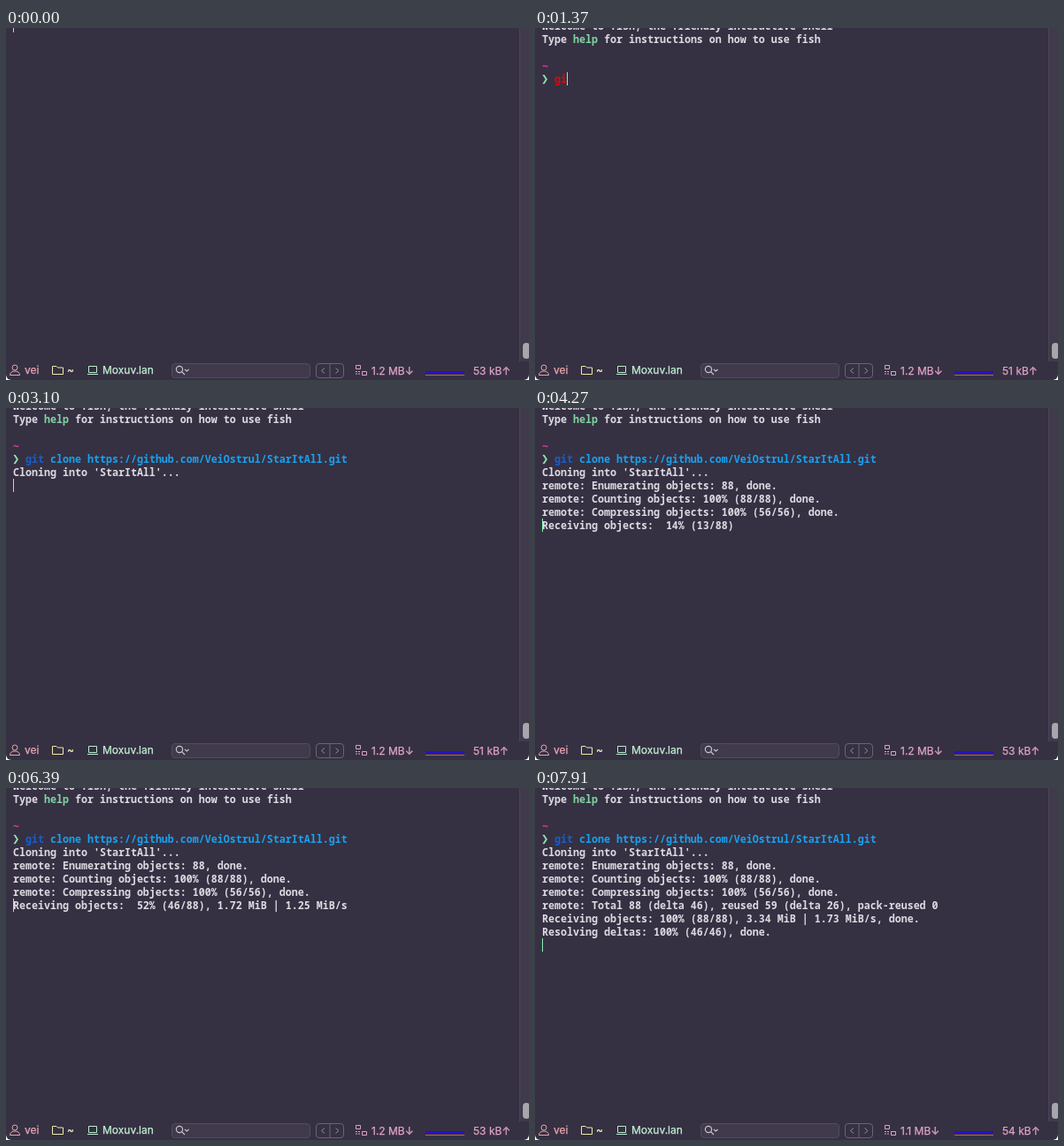
Write an HTML page that moves like this. It is 591x398 px and loops after 8 s.

```html
<!DOCTYPE html>
<html lang="en">
<head>
<meta charset="utf-8">
<title>Terminal clone</title>
<style>
html, body { margin: 0; width: 100%; height: 100%; overflow: hidden; background: #fff; }
#window { position: absolute; left: 0; top: 0; width: 591px; height: 398px; overflow: hidden;
  background: #363043; border-radius: 0 0 6px 6px; }
.row, .label, #cursor, svg { position: absolute; }
.row { left: 8px; height: 15px; white-space: pre; color: #dddae1;
  font: 600 11.667px/15px "Noto Sans Mono", monospace; }
.mark, .tilde { display: inline-block; width: 7px; line-height: 0;
  font-family: "DejaVu Sans Mono", monospace; font-weight: 700; }
.mark { position: relative; left: -1px; color: #8fe0ae; font-size: 14px; }
.tilde { color: #d63da2; }
.help { color: #80d5a2; }
.bad { color: #e00808; }
.cmd { color: #1460cf; }
.arg { color: #18a2ee; }
.hint { color: #69636f; }
.prefix { text-decoration: underline; }
#cursor { width: 1px; height: 15px; background: #8cf0b4; }
svg { left: 0; top: 0; }
.label { top: 379px; white-space: pre; font: 400 12px/16px Inter, sans-serif; -webkit-text-stroke: .25px; }
.net { top: 380px; color: #e0a4c6; }
</style>
</head>
<body>
<div id="window">
  <svg width="591" height="398" fill="none">
    <rect x="580" width="11" height="377" fill="#403a4c"/>
    <path d="M580.5 0V377" stroke="#4a4455"/>
    <rect x="584" y="356" width="8" height="18" rx="4" fill="#a8a5ad"/>
    <g stroke="#e6a4ab">
      <circle cx="10" cy="384" r="3"/>
      <path d="M4.5 392.5C4.5 389.5 7 388 10 388S15.5 389.5 15.5 392.5Z"/>
    </g>
    <path d="M52.5 382.5H57L58.5 384H64.5V391.5H52.500Z" stroke="#eeeaa8"/>
    <path d="M93.5 382.5H102.5V389.5H93.5ZM92 391.5H104" stroke="#b9eccb"/>
    <rect x="187.5" y="379.5" width="156" height="16" rx="3.5" fill="#403a4c" stroke="#524c5d"/>
    <g stroke="#c7c4cc" stroke-width="1.2">
      <circle cx="196" cy="386" r="3.6"/>
      <path d="M198.7 388.7L202 392M202 386L204.3 388L206.6 386"/>
    </g>
    <g stroke="#6a6573">
      <rect x="350.5" y="379.5" width="31" height="16" rx="3.5"/>
      <path d="M366 380V395"/>
      <path d="M360 384.5L356.5 387.5L360 390.5M372.5 384.5L376 387.5L372.5 390.5" stroke="#918c99"/>
    </g>
    <g stroke="#dda2c4">
      <path d="M395.5 381.5H400.5V385.5H395.5ZM402.5 388.5H407.5V392.5H402.5Z"/>
      <path d="M395 388.5H401M395 391H401" stroke-dasharray="2 1"/>
    </g>
    <path d="M474 389.5H518" stroke="#2412c8" stroke-width="3"/>
    <path d="M474 392.5H518" stroke="#b95f5e"/>
  </svg>
  <div class="label" style="left:21px;color:#eba9b0">vei</div>
  <div class="label" style="left:69px;color:#f2eeae">~</div>
  <div class="label" style="left:109px;color:#c1f1d2">Moxuv.lan</div>
  <div class="label net" id="down" style="left:413px"></div>
  <div class="label net" id="up" style="left:528px"></div>
  <div id="cursor"></div>
</div>
<script>
const LOOP = 8000, ROW = 15, COL = 7, FIRST_TOP = -10;
const win = document.getElementById("window");
const cursor = document.getElementById("cursor");

const span = (name, text) => `<span class="${name}">${text}</span>`;
const prompt = (text = "") => span("mark", "❯") + " " + text;
const git = span("cmd", "git ");
const url = "https://github.com/VeiOstrul/StarItAll.git";
const progress = (label, done, total, rest = "") =>
  `${label}: ${String(Math.floor(done * 100 / total)).padStart(3)}% (${done}/${total})${rest}`;
const receive = (done, size, speed, end = "") =>
  progress("Receiving objects", done, 88, size ? `, ${size} MiB | ${speed} MiB/s${end}` : "");
const resolve = (done, end) => progress("Resolving deltas", done, 46, end);

// Each timeline is a list of [start time, value].
const rows = [
  [[310, "Welcome to fish, the friendly interactive shell"]],
  [[310, `Type ${span("help", "help")} for instructions on how to use fish`]],
  [],
  [[420, span("tilde", "~")]],
  [
    [420, prompt()],
    [1270, prompt(span("bad", "g"))],
    [1370, prompt(span("bad", "gi"))],
    [1430, prompt(span("bad", "git"))],
    [1580, prompt(git)],
    [1870, prompt(git + span("cmd", "c"))],
    [2030, prompt(git + span("arg prefix", "c") + span("hint", "lone " + url))],
    [2570, prompt(git + span("arg", "clone " + url))]
  ],
  [[3100, "Cloning into 'StarItAll'..."]],
  [[3820, "remote: Enumerating objects: 88, done."]],
  [
    [3970, progress("remote: Counting objects", 55, 88)],
    [4070, progress("remote: Counting objects", 88, 88, ", done.")]
  ],
  [
    [4070, progress("remote: Compressing objects", 28, 56)],
    [4170, progress("remote: Compressing objects", 56, 56, ", done.")]
  ],
  [
    [4170, receive(2)], [4270, receive(13)], [4370, receive(18)],
    [4450, receive(25)], [4530, receive(30)],
    [5500, receive(33, "1.18", "1.13")],
    [6390, receive(46, "1.72", "1.25")],
    [6490, "remote: Total 88 (delta 46), reused 59 (delta 26), pack-reused 0"]
  ],
  [
    [6490, receive(53, "1.72", "1.25")],
    [6690, receive(64, "1.72", "1.25")],
    [6890, receive(72, "2.26", "1.47")],
    [6990, receive(78, "2.26", "1.47")],
    [7090, receive(82, "2.26", "1.47")],
    [7190, receive(84, "2.26", "1.47")],
    [7290, receive(86, "2.26", "1.47")],
    [7390, receive(88, "2.26", "1.47")],
    [7490, receive(88, "3.34", "1.73", ", done.")]
  ],
  [[7490, resolve(0)], [7590, resolve(16)], [7790, resolve(31)], [7910, resolve(46, ", done.")]]
];

// Cursor values are [row, column]; null hides it.
const cursorSteps = [
  [0, [0, 0]], [310, [2, 0]], [420, [4, 2]], [1270, [4, 3]], [1370, [4, 4]],
  [1430, [4, 5]], [1580, [4, 6]], [1870, [4, 7]], [2570, [4, 54]], [3060, [5, 0]],
  [3100, [6, 0]], [3820, [7, 0]], [4070, [8, 0]], [4170, [9, 0]], [6490, [10, 0]],
  [6890, null], [7490, [11, 0]], [7910, [12, 0]]
];

const tracks = rows.map((steps, i) => {
  const el = document.createElement("div");
  el.className = "row";
  el.style.top = FIRST_TOP + i * ROW + "px";
  win.insertBefore(el, cursor);
  return { steps, show: html => el.innerHTML = html || "" };
});
const track = (id, steps) =>
  tracks.push({ steps, show: text => document.getElementById(id).textContent = text });
track("down", [[0, "1.2 MB↓"], [7490, "1.1 MB↓"]]);
track("up", [[0, "53 kB↑"], [420, "51 kB↑"], [3820, "53 kB↑"], [6490, "59 kB↑"], [7490, "54 kB↑"]]);
tracks.push({ steps: cursorSteps, show: place => {
  cursor.style.display = place ? "block" : "none";
  if (!place) return;
  cursor.style.top = FIRST_TOP + place[0] * ROW + "px";
  cursor.style.left = 8 + place[1] * COL + "px";
} });

function draw(now) {
  const t = now % LOOP;
  for (const item of tracks) {
    const index = item.steps.filter(step => step[0] <= t).length - 1;
    if (index === item.index) continue;
    item.index = index;
    item.show(index < 0 ? null : item.steps[index][1]);
  }
}

const start = performance.now();
function tick() {
  draw(performance.now() - start);
  requestAnimationFrame(tick);
}
tick();
</script>
</body>
</html>
```
